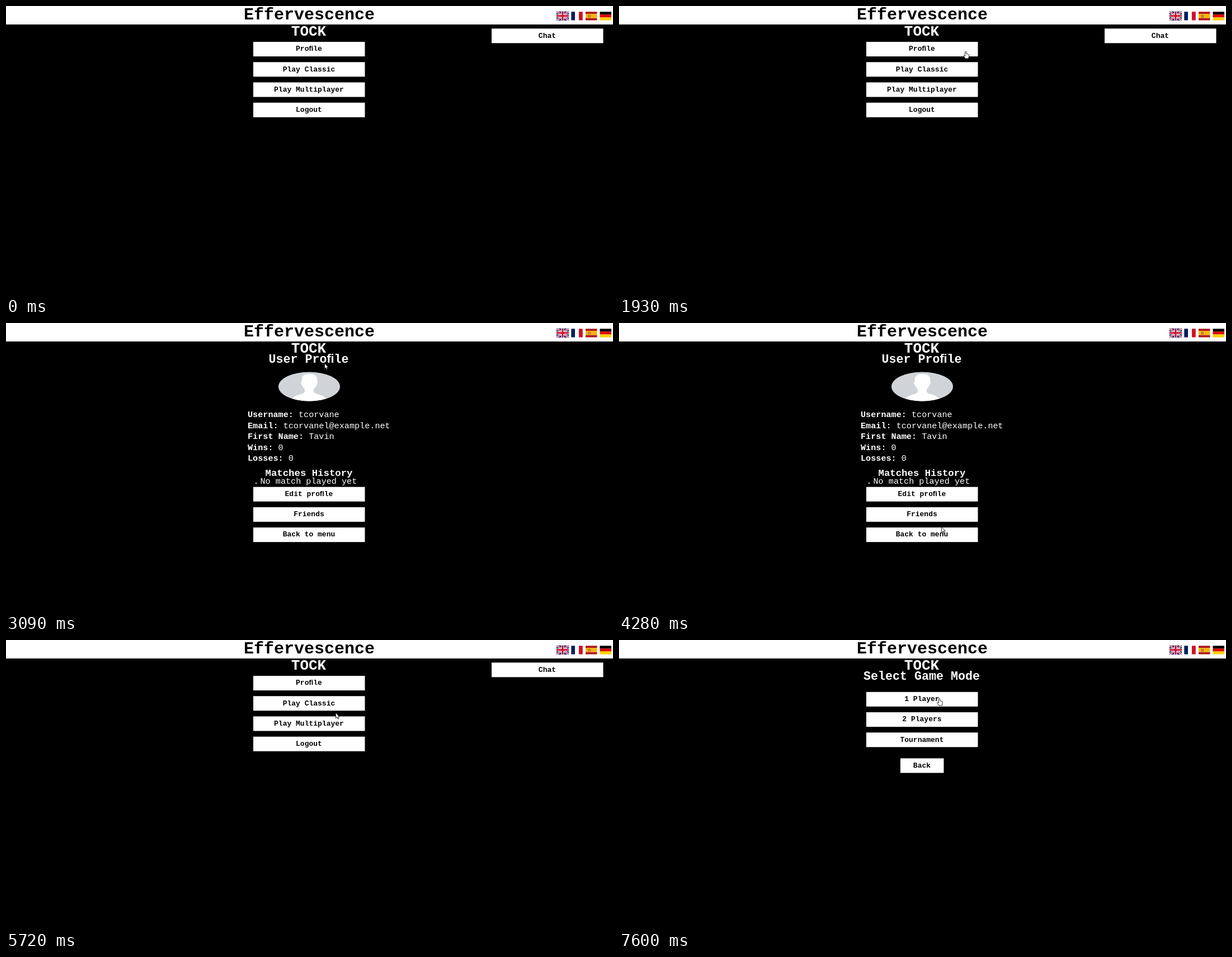
These frames come from a looping animation (1085 by 516 pixels, 8000 ms). An HTML page with a canvas:

```html
<!DOCTYPE html>
<html lang="en">
<head>
<meta charset="utf-8">
<title>Game menu</title>
<style>
html, body { margin: 0; width: 100%; height: 100%; overflow: hidden; background: #000; }
canvas { display: block; }
</style>
</head>
<body>
<canvas id="stage" width="1085" height="516"></canvas>
<script>
const ctx = document.getElementById('stage').getContext('2d');
const LOOP = 8000;
const MID = 542;

function rect(x, y, w, h, color) {
  ctx.fillStyle = color;
  ctx.fillRect(x, y, w, h);
}

function text(str, x, y, size, color, align = 'center', weight = 'bold') {
  ctx.font = `${weight} ${size}px "Liberation Mono", monospace`;
  ctx.textAlign = align;
  ctx.fillStyle = color;
  ctx.fillText(str, x, y);
  return ctx.measureText(str).width;
}

// Pages: a column of buttons each, spaced evenly
const column = (top, labels) =>
  labels.map((label, i) => ({ label, x: 442, y: top + i * 36.2, w: 199.5, h: 26 }));

const pages = {
  menu: {
    buttons: [
      ...column(64, ['Profile'.replace('fi', '\ufb01'), 'Play Classic', 'Play Multiplayer', 'Logout']),
      { label: 'Chat', x: 868, y: 40.3, w: 199.5, h: 26 }
    ]
  },
  profile: {
    heading: 'User Pro\ufb01le',
    draw: drawProfile,
    buttons: column(292.7, ['Edit pro\ufb01le', 'Friends', 'Back to menu'])
  },
  modes: {
    heading: 'Select Game Mode',
    buttons: [
      ...column(92.8, ['1 Player', '2 Players', 'Tournament']),
      { label: 'Back', x: 503, y: 211.3, w: 77.5, h: 26 }
    ]
  }
};

function pageAt(t) {
  if (t < 3090) return pages.menu;
  if (t < 4760) return pages.profile;
  return t < 7260 ? pages.menu : pages.modes;
}

// Cursor moves: start time, number of steps, step length, end point,
// optional start point, control point and easing power
const moves = [
  { t: 70, n: 3, step: 57, from: [1064, 496], to: [1037, 74] },
  { t: 1300, n: 12, step: 70, from: [908, 184], to: [581, 67], pow: 1.25 },
  { t: 2220, n: 3, step: 70, to: [569.5, 72] },
  { t: 3360, n: 12, step: 70, ctrl: [264, 425], to: [568, 385] },
  { t: 4200, n: 2, step: 80, to: [576.5, 364] },
  { t: 4480, n: 3, step: 70, to: [564.5, 373.5] },
  { t: 4960, n: 5, step: 67, to: [695, 274] },
  { t: 5300, n: 9, step: 70, to: [577, 113], pow: 1.5 },
  { t: 7460, n: 3, step: 70, to: [572.5, 104] }
];
const clicks = [2890, 4620, 7120];

function cursorAt(t) {
  if (t < 70 || (t >= 240 && t < 1300)) return null;
  let i = moves.length - 1;
  while (moves[i].t > t) i--;
  const m = moves[i];
  const k = Math.min(m.n - 1, Math.floor((t - m.t) / m.step));
  const u = m.from ? k / (m.n - 1) : (k + 1) / m.n;
  const p = 1 - Math.pow(1 - u, m.pow || 1);
  const a = m.from || moves[i - 1].to;
  const b = m.to;
  return a.map((v, d) => {
    const c = m.ctrl ? m.ctrl[d] : (v + b[d]) / 2;
    return (1 - p) * (1 - p) * v + 2 * p * (1 - p) * c + p * p * b[d];
  });
}

function drawCursor(page, t) {
  const pos = cursorAt(t);
  if (!pos) return;
  const [x, y] = pos;
  const over = page.buttons.some(b => x >= b.x && x < b.x + b.w && y >= b.y && y < b.y + b.h);
  if (clicks.some(c => t >= c && t < c + 70)) {
    ctx.fillStyle = 'rgba(250,232,20,.75)';
    ctx.beginPath();
    ctx.arc(x, y + 1, 6.5, 0, Math.PI * 2);
    ctx.fill();
  }
  const shape = over
    ? 'M-1.2 7V1Q0 -.5 1.2 1V4.5Q2.2 4 3 5Q4 4.6 4.6 5.6Q6 5.4 5.8 7V9.5L4.6 13H-.8L-3.6 8.4Q-3.6 6.6-2.2 7.2L-1.2 8.4Z'
    : 'M0 0V9.8L2.2 7.8L3.7 11.2L5.2 10.5L3.8 7.3H6.8Z';
  const path = new Path2D(shape);
  ctx.save();
  ctx.translate(x, y);
  ctx.fillStyle = '#fff';
  ctx.fill(path);
  ctx.strokeStyle = '#111';
  ctx.lineWidth = .9;
  ctx.stroke(path);
  ctx.restore();
}

function stripes(x, colors, shares, upright) {
  let at = 0;
  colors.forEach((c, i) => {
    const s = shares[i];
    if (upright) rect(x + at * 20.5, 10.3, s * 20.5, 15.2, c);
    else rect(x, 10.3 + at * 15.2, 20.5, s * 15.2, c);
    at += s;
  });
}

function drawBritain() {
  const x = 983.7, y = 9.5, w = 22.5, h = 16.5;
  const lines = (d, width, color) => {
    ctx.lineWidth = width;
    ctx.strokeStyle = color;
    ctx.stroke(new Path2D(d));
  };
  const diagonals = `M0 0L${w} ${h}M${w} 0L0 ${h}`;
  const cross = `M${w / 2} 0V${h}M0 ${h / 2}H${w}`;
  ctx.save();
  ctx.translate(x, y);
  ctx.beginPath();
  ctx.rect(0, 0, w, h);
  ctx.clip();
  rect(0, 0, w, h, '#10266f');
  lines(diagonals, 3.2, '#fff');
  lines(diagonals, 1.1, '#c8102e');
  lines(cross, 5.2, '#fff');
  lines(cross, 3, '#c8102e');
  ctx.restore();
}

function drawFlags() {
  const third = [1 / 3, 1 / 3, 1 / 3];
  drawBritain();
  stripes(1010.3, ['#001f5f', '#fff', '#ce1126'], third, true);
  stripes(1036, ['#ad1519', '#f6b50f', '#ad1519'], [.25, .5, .25]);
  rect(1040.5, 16, 4.5, 4.5, '#b5651d');
  rect(1041.8, 17, 2, 2.5, '#d8a08a');
  stripes(1061.5, ['#000', '#dd0000', '#ffce00'], third);
}

function drawAvatar() {
  ctx.save();
  ctx.beginPath();
  ctx.ellipse(MID, 113.5, 55, 26, 0, 0, Math.PI * 2);
  ctx.clip();
  rect(486, 87, 112, 53, '#d0d4d8');
  ctx.fillStyle = '#fff';
  ctx.fill(new Path2D('M529 104Q527 91 542 91Q558 91 556 104Q559 106 555 111Q553 116 550 118V123Q552 126 560 128Q572 131 574 140H510Q512 131 524 128Q532 126 534 123V118Q531 116 529 111Q525 106 529 104Z'));
  ctx.restore();
}

function drawProfile() {
  drawAvatar();
  const size = 15.17;
  const fields = {
    Username: 'tcorvane',
    Email: 'tcorvanel@example.net',
    'First Name': 'Tavin',
    Wins: '0',
    Losses: '0'
  };
  Object.entries(fields).forEach(([name, value], i) => {
    const y = 168.4 + i * 19.5;
    const w = text(name + ': ', 432, y, size, '#fff', 'left');
    text(value, 432 + w, y, size, '#fff', 'left', 'normal');
  });
  text('Matches History', MID - .5, 272.5, 17.33, '#fff');
  text('.', 442.5, 286.5, size, '#fff', 'left', 'normal');
  text('No match played yet', 454.5, 286.5, size, '#fff', 'left', 'normal');
}

function render(t) {
  const page = pageAt(t);
  rect(0, 0, 1085, 516, '#000');
  rect(0, 0, 1085, 33, '#fff');
  text('Effervescence', MID, 23.5, 30, '#000');
  drawFlags();
  text('TOCK', MID - 1, 52.5, 26, '#fff');
  if (page.heading) text(page.heading, MID - 1, 71.3, 21.67, '#fff');
  if (page.draw) page.draw();
  for (const b of page.buttons) {
    rect(b.x, b.y, b.w, b.h, '#fff');
    text(b.label, b.x + b.w / 2 - .3, b.y + 16.3, 13, '#000');
  }
  drawCursor(page, t);
}

const start = performance.now();
function frame() {
  render((performance.now() - start) % LOOP);
  requestAnimationFrame(frame);
}
frame();
</script>
</body>
</html>
```
